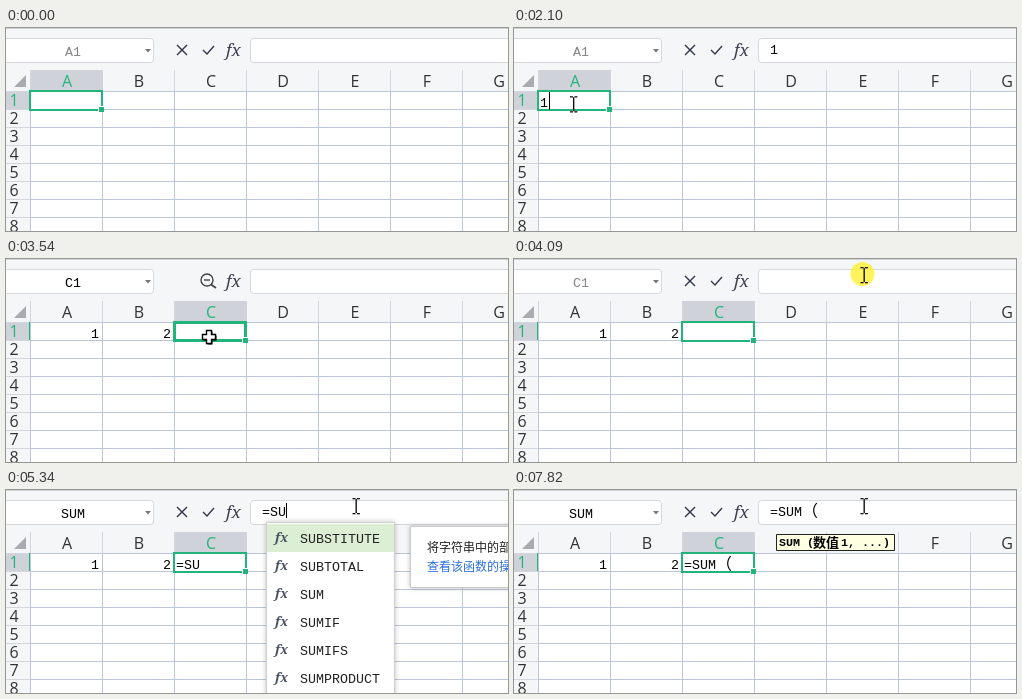
An HTML page with a canvas for the animation above (8 s loop, 502 by 203 pixels).

```html
<!DOCTYPE html>
<html lang="zh">
<head>
<meta charset="utf-8">
<style>
html, body { margin: 0; overflow: hidden; background: #f5f6f8; }
canvas { display: block; }
</style>
</head>
<body>
<canvas id="stage" width="502" height="203"></canvas>
<script>
const ctx = document.getElementById('stage').getContext('2d');
const LOOP = 8000, GREEN = '#22b57b', INK = '#333', GRID = '#bdc6d8';
const MONO = '"Liberation Mono", monospace';
const SANS = '"Open Sans", "Noto Sans", sans-serif';
const CJK = '"Noto Sans CJK SC", "Noto Sans CJK", sans-serif';
const SERIF = '"Noto Serif", serif';

// Each step changes part of the sheet state from its time on.
const steps = [
  [0, { col: 0, edit: true, name: 'A1', input: '', vals: [], list: null, tip: null, hint: false }],
  [1890, { input: '1' }],
  [2480, { col: 1, edit: false, name: 'B1', input: '', vals: ['1'] }],
  [2850, { edit: true }],
  [2920, { input: '2' }],
  [3540, { col: 2, edit: false, name: 'C1', input: '', vals: ['1', '2'] }],
  [4090, { edit: true }],
  [4680, { input: '=', name: 'SUM' }],
  [5270, { input: '=S', list: 'SEARCH SEARCHB SECOND SERIESSUM SIGN SIN' }],
  [5340, { input: '=SU', list: 'SUBSTITUTE SUBTOTAL SUM SUMIF SUMIFS SUMPRODUCT', tip: '将字符串中的部分字符串' }],
  [6420, { input: '=SUM', list: 'SUM SUMIF SUMIFS SUMPRODUCT SUMSQ SUMX2MY2' }],
  [6490, { tip: '返回某一单元格区域中' }],
  [7550, { input: '=SUM（', list: null, tip: null, hint: true }]
];
const carets = [[1080, 1410, 27, 64], [1940, 2480, 35, 64], [2920, 3540, 107, 64],
  [4680, 5140, 264, 13], [5270, 5340, 272, 13], [5340, 5670, 280, 13], [6220, 6420, 280, 13],
  [6420, 6750, 288, 13], [7280, 7550, 288, 13], [7550, 7820, 304, 13]];
const path = [[260, 422, 196], [1010, 50, 76], [2020, 50, 76], [2420, 139, 78],
  [3340, 139, 78], [3540, 203, 78], [3720, 203, 78], [4090, 350, 16], [LOOP, 350, 16]];
const clicks = [[1010, 1080], [2480, 2640], [3600, 3740], [4090, 4220]];

const stateAt = t => Object.assign({}, ...steps.filter(s => s[0] <= t).map(s => s[1]));

function pointerAt(t) {
  if (t < path[0][0]) return null;
  const i = path.findIndex(p => p[0] > t), [t0, x0, y0] = path[i - 1], [t1, x1, y1] = path[i];
  const k = (t - t0) / (t1 - t0), e = k * k * (3 - 2 * k);
  return [x0 + (x1 - x0) * e, y0 + (y1 - y0) * e];
}

function rect(x, y, w, h, color) {
  ctx.fillStyle = color;
  ctx.fillRect(x, y, w, h);
}

function box(x, y, w, h, fill, border, r = 0) {
  ctx.beginPath();
  ctx.roundRect(x + .5, y + .5, w - 1, h - 1, r);
  ctx.fillStyle = fill;
  ctx.fill();
  stroke(border, 1);
}

function stroke(color, width) {
  ctx.strokeStyle = color;
  ctx.lineWidth = width;
  ctx.stroke();
}

function line(points, color, width) {
  ctx.beginPath();
  points.forEach(([x, y]) => ctx.lineTo(x, y));
  stroke(color, width);
}

function poly(points, color) {
  ctx.beginPath();
  points.forEach(([x, y]) => ctx.lineTo(x, y));
  ctx.closePath();
  ctx.fillStyle = color;
  ctx.fill();
}

function text(s, x, y, font, color = '#000', align = 'left') {
  ctx.font = font;
  ctx.fillStyle = color;
  ctx.textAlign = align;
  ctx.fillText(s, x, y);
}

// Half-width characters take 8 px, the full-width bracket 16 px.
function code(s, x, y, color, align) {
  const plain = s.replace('（', '');
  text(plain, x, y, '13.33px ' + MONO, color, align);
  if (plain !== s) text('（', x + plain.length * 8, y, '16px ' + CJK, color);
}

function toolbar(s) {
  rect(0, 0, 502, 203, '#f5f6f8');
  rect(0, 0, 502, 1, '#d2d3d6');
  box(-3, 10, 151, 25, '#fff', '#d6d7da', 3);
  box(244, 10, 270, 25, '#fff', '#d6d7da', 3);
  const pale = s.edit && s.name !== 'SUM';
  code(s.name, 67, 28, pale ? '#858585' : '#000', 'center');
  poly([[139, 21], [145, 21], [142, 24.5]], '#777');
  if (s.edit) {
    line([[171, 17], [181, 27]], '#33384d', 1.4);
    line([[181, 17], [171, 27]], '#33384d', 1.4);
    line([[197, 22], [201, 26], [208, 18]], '#33384d', 1.4);
  } else {
    ctx.beginPath();
    ctx.arc(201, 21, 6, 0, 7);
    stroke('#444', 1.4);
    line([[198, 21], [204, 21]], '#444', 1.4);
    line([[205, 25.5], [210, 29]], '#444', 1.8);
  }
  text('fx', 220, 28, 'italic 17px ' + SERIF, '#3b3f50');
  code(s.input, 256, 26);
}

function sheet(s) {
  const left = 24 + s.col * 72;
  rect(24, 63, 478, 140, '#fff');
  rect(left, 42, 73, 21, '#cfd2d8');
  rect(0, 63, 24, 18, '#cfd2d8');
  for (let i = 0; i < 7; i++) {
    const x = 24 + i * 72;
    rect(x, 42, 1, 21, '#d3d6dc');
    rect(x, 63, 1, 140, GRID);
    text('ABCDEFG'[i], x + 37, 59, '16px ' + SANS, i === s.col ? GREEN : INK, 'center');
  }
  for (let i = 0; i < 8; i++) {
    const y = 63 + i * 18;
    rect(0, y, 24, 1, '#d3d6dc');
    rect(24, y, 478, 1, GRID);
    text(i + 1, 8, y + 15, '16px ' + SANS, i ? INK : GREEN, 'center');
  }
  poly([[20, 47], [20, 59], [8, 59]], '#a9abb0');
  rect(23, 63, 1, 18, GREEN);
  s.vals.forEach((v, i) => code(v, 93 + i * 72, 79, '#000', 'right'));

  const w = s.edit ? 2 : 3, half = w / 2;
  ctx.strokeStyle = GREEN;
  ctx.lineWidth = w;
  ctx.strokeRect(left - 1 + half, 62 + half, 74 - w, 21 - w);
  rect(left + 68, 78, 6, 6, '#fff');
  rect(left + 69, 79, 5, 5, GREEN);
  if (s.edit) code(s.input, left + 2, 79);
}

function panel(x, y, w, h, border) {
  ctx.save();
  ctx.shadowColor = 'rgba(0,0,0,.25)';
  ctx.shadowBlur = 5;
  rect(x, y, w, h, '#fff');
  ctx.restore();
  box(x, y, w, h, '#fff', border);
}

function popups(s) {
  if (s.list) {
    panel(260, 32, 129, 190, '#cfcfcf');
    rect(261, 34, 127, 28, '#dcefd4');
    s.list.split(' ').forEach((word, i) => {
      const y = 52 + i * 28;
      text('fx', 269, y, 'italic bold 13px ' + SERIF, '#4a5064');
      code(word, 294, y + 1, '#222');
    });
  }
  if (s.tip) {
    panel(404, 36, 120, 62, '#c8c8c8');
    text(s.tip, 421, 62, '12px ' + CJK, '#222');
    text('查看该函数的操作技巧', 421, 81, '12px ' + CJK, '#2a6fe0');
  }
  if (s.hint) {
    box(262, 44, 119, 17, '#ffffe1', '#222');
    const font = 'bold 11.67px ' + MONO;
    text('SUM (', 265, 56, font);
    text('数值', 299, 57, 'bold 13px ' + CJK);
    text('1, ...)', 327, 56, font);
  }
}

function pointer(x, y, beam) {
  if (beam) {
    rect(x - .5, y - 7, 1.4, 14, '#111');
    for (const dy of [-8, 7]) {
      rect(x - 3.5, y + dy, 3, 1.3, '#111');
      rect(x + .9, y + dy, 3, 1.3, '#111');
    }
    return;
  }
  const cross = [[-2.5, -6.5], [2.5, -6.5], [2.5, -2.5], [6.5, -2.5], [6.5, 2.5], [2.5, 2.5],
    [2.5, 6.5], [-2.5, 6.5], [-2.5, 2.5], [-6.5, 2.5], [-6.5, -2.5], [-2.5, -2.5]];
  const at = d => cross.map(([a, b]) => [x + a + d, y + b + d]);
  poly(at(1), '#000');
  poly(at(0), '#fff');
  stroke('#000', 1.4);
}

function draw(t) {
  const s = stateAt(t), p = pointerAt(t);
  toolbar(s);
  sheet(s);
  popups(s);
  for (const [from, to, x, y] of carets)
    if (t >= from && t < to) rect(x, y, 1, y > 40 ? 18 : 15, '#000');
  if (!p) return;
  const [x, y] = p;
  if (clicks.some(([from, to]) => t >= from && t < to)) {
    ctx.beginPath();
    ctx.arc(x - 1.5, y - 1, 12, 0, 7);
    ctx.fillStyle = 'rgba(255,241,50,.8)';
    ctx.fill();
  }
  const left = 24 + s.col * 72;
  const inCell = s.edit && x > left && x < left + 72 && y > 63 && y < 81;
  pointer(x, y, y < 42 || inCell);
}

function tick() {
  draw(performance.now() % LOOP);
  requestAnimationFrame(tick);
}
tick();
</script>
</body>
</html>
```
